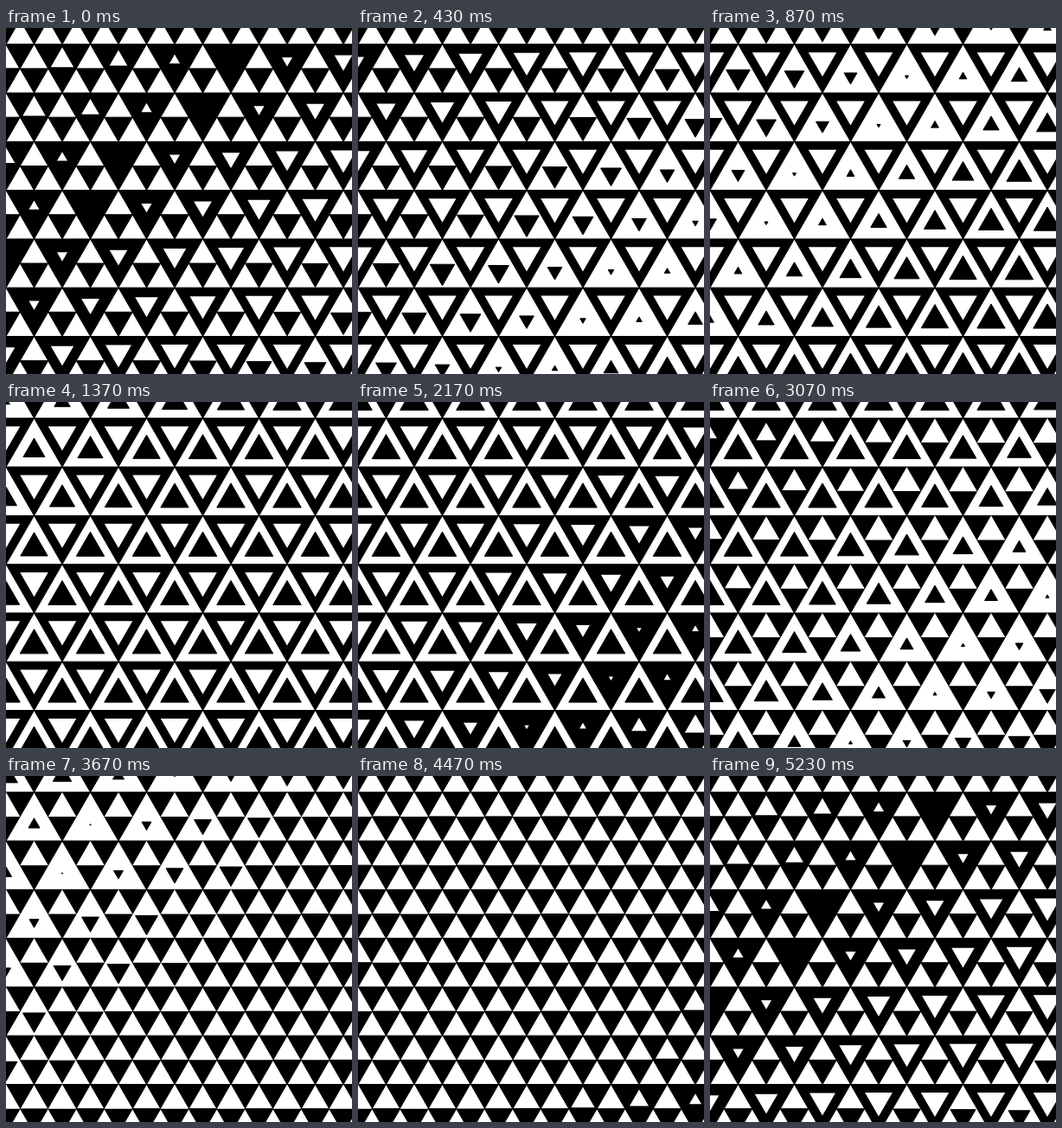
These frames come from a looping animation (400 by 400 pixels, 5260 ms). An HTML page with a canvas:

```html
<!DOCTYPE html>
<html lang="en">
<head>
<meta charset="utf-8">
<title>Triangle wave</title>
<style>
  html, body { margin: 0; width: 100%; height: 100%; overflow: hidden; background: #fff; }
  canvas { display: block; width: 400px; height: 400px; }
</style>
</head>
<body>
<canvas id="stage" width="400" height="400"></canvas>
<script>
const ctx = document.getElementById('stage').getContext('2d');

const LOOP = 5260;            // ms
const CYCLE = 157;            // steps in one full cycle
const HALF = CYCLE / 2;
const STEP_MS = 100 / 3;
const LAG = 2.5;              // steps between neighbouring diagonals
const TURN = 17.5;            // half the length of one flip, in steps
const UP_DELAY = 24.25;       // upright triangles flip later

const SIDE = 65;
const HEIGHT = SIDE * Math.sqrt(3) / 2;
const TOP = 18.75;

// Triangle around its centroid; dir is 1 for upright, -1 for inverted.
function triangle(x, y, scale, dir, color, outlined) {
  const w = SIDE / 2 * scale;
  const h = HEIGHT / 3 * scale * dir;
  ctx.beginPath();
  ctx.moveTo(x, y - 2 * h);
  ctx.lineTo(x + w, y + h);
  ctx.lineTo(x - w, y + h);
  ctx.closePath();
  ctx.fillStyle = color;
  ctx.fill();
  if (outlined) {
    ctx.strokeStyle = color;
    ctx.lineWidth = 1;
    ctx.stroke();
  }
}

// Signed size of the inner triangle: +0.5 matches its parent, -0.5 is flipped.
function innerScale(step, diagonal) {
  const raw = step + LAG * (diagonal - 5) + HALF / 2;
  const u = (raw % CYCLE + CYCLE) % CYCLE;
  const x = Math.max(-1, Math.min(1, (u % HALF - HALF / 2) / TURN));
  const s = 0.5 * Math.sign(x) * (1 - Math.pow(1 - Math.abs(x), 3));
  return u < HALF ? s : -s;
}

function inner(x, y, s, dir, color, outlined) {
  if (Math.abs(s) > 0.002) triangle(x, y, Math.abs(s), s > 0 ? dir : -dir, color, outlined);
}

function eachCell(fn) {
  for (let row = 0; row <= 7; row++) {
    for (let col = -1; col <= 7; col++) {
      const x = SIDE * (col + (row % 2 ? 0 : 0.5));
      fn(x, TOP + HEIGHT * (row - 1), row + col);
    }
  }
}

function draw(step) {
  ctx.fillStyle = '#fff';
  ctx.fillRect(0, 0, 400, 400);
  eachCell((x, y) => triangle(x, y + HEIGHT / 3, 1, -1, '#000', true));
  eachCell((x, y, diagonal) => {
    inner(x, y + HEIGHT / 3, innerScale(step, diagonal), -1, '#fff', false);
    inner(x + SIDE / 2, y + HEIGHT * 2 / 3, innerScale(step - UP_DELAY, diagonal), 1, '#000', true);
  });
}

const start = performance.now();
function tick() {
  const t = (performance.now() - start) % LOOP;
  draw(Math.min(CYCLE, Math.floor((t + 4) / STEP_MS)));
  requestAnimationFrame(tick);
}
tick();
</script>
</body>
</html>
```
